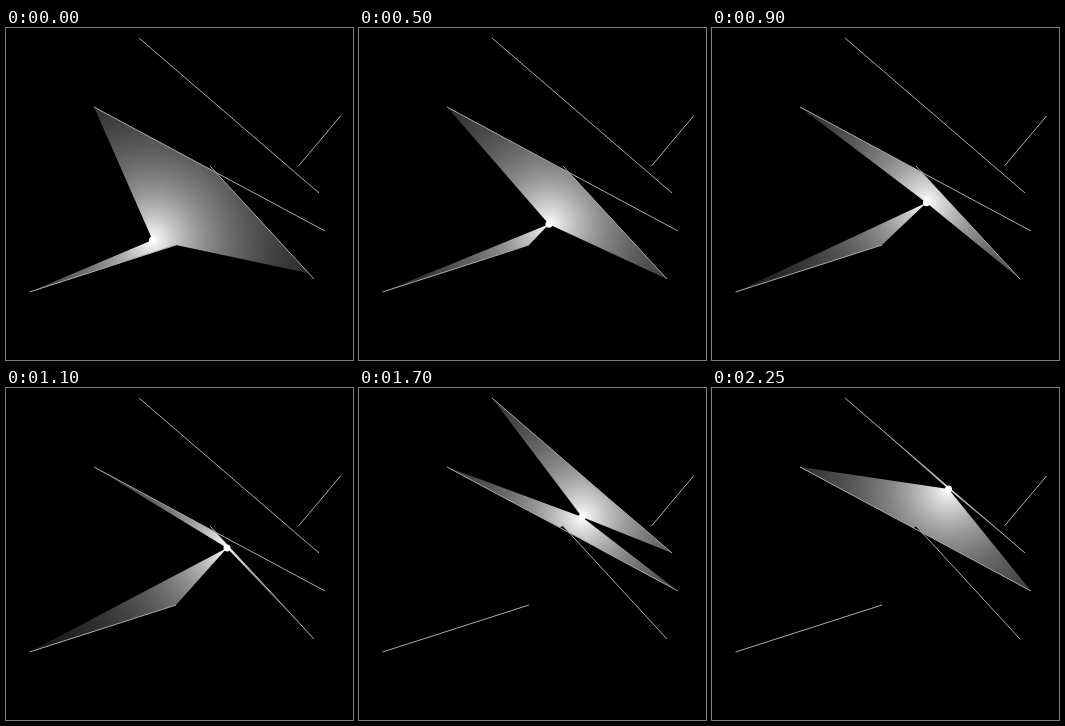
An HTML page with a canvas for the animation above (2.3 s loop, 347 by 332 pixels).

```html
<!DOCTYPE html>
<html lang="en">
<head>
<meta charset="utf-8">
<title>Light and walls</title>
<style>
html, body { margin: 0; width: 100%; height: 100%; overflow: hidden; background: #000; }
canvas { display: block; width: 347px; height: 332px; }
</style>
</head>
<body>
<canvas id="stage" width="347" height="332"></canvas>
<script>
const ctx = document.getElementById('stage').getContext('2d');
const LOOP = 2300, STEP = 50, REACH = 250, FADE = 90;

// x1, y1, x2, y2
const walls = [
  [133, 10, 313, 165],
  [334.5, 88, 292.5, 138],
  [88, 79, 319, 203],
  [204, 138, 308, 251],
  [23.5, 264, 170, 217]
];

// Key points of the light: time, x, y
const path = [
  [0, 146.5, 212],
  [700, 205, 188],
  [1100, 221, 160],
  [1350, 231, 146],
  [1700, 223, 129],
  [2250, 236.5, 101]
];

function slope(i, k) {
  const a = path[Math.max(i - 1, 0)], b = path[Math.min(i + 1, path.length - 1)];
  return (b[k] - a[k]) / (b[0] - a[0]);
}

// Smooth curve through the key points
function lightAt(t) {
  let i = 0;
  while (i < path.length - 2 && t >= path[i + 1][0]) i++;
  const a = path[i], b = path[i + 1], span = b[0] - a[0];
  const u = Math.min((t - a[0]) / span, 1), v = 1 - u;
  return [1, 2].map(k => a[k] * v * v * (1 + 2 * u) + b[k] * u * u * (3 - 2 * u)
    + span * u * v * (v * slope(i, k) - u * slope(i + 1, k)));
}

// Distance along a ray to the line of a wall, and the place on that wall
function cast(p, angle, w) {
  const dx = Math.cos(angle), dy = Math.sin(angle);
  const ex = w[2] - w[0], ey = w[3] - w[1];
  const fx = w[0] - p[0], fy = w[1] - p[1];
  const det = dx * ey - dy * ex;
  return { dist: (fx * ey - fy * ex) / det, at: (fx * dy - fy * dx) / det };
}

const along = (p, angle, d) => [p[0] + Math.cos(angle) * d, p[1] + Math.sin(angle) * d];

function crossings() {
  const found = [];
  walls.forEach((a, i) => walls.slice(i + 1).forEach(b => {
    const angle = Math.atan2(a[3] - a[1], a[2] - a[0]);
    const length = Math.hypot(a[2] - a[0], a[3] - a[1]);
    const hit = cast(a, angle, b);
    if (hit.dist > 0 && hit.dist < length && hit.at > 0 && hit.at < 1) {
      found.push(along(a, angle, hit.dist));
    }
  }));
  return found;
}

const corners = walls.flatMap(w => [[w[0], w[1]], [w[2], w[3]]]).concat(crossings());

function nearest(p, angle) {
  let best = null, dist = Infinity;
  for (const w of walls) {
    const hit = cast(p, angle, w);
    if (hit.dist > 0 && hit.dist < dist && hit.at >= 0 && hit.at <= 1) {
      best = w;
      dist = hit.dist;
    }
  }
  return best;
}

// One triangle per gap between corner angles, out to the nearest wall
function litArea(p) {
  const angles = corners.map(c => Math.atan2(c[1] - p[1], c[0] - p[0])).sort((a, b) => a - b);
  angles.push(angles[0] + 2 * Math.PI);
  ctx.beginPath();
  for (let i = 0; i < angles.length - 1; i++) {
    const from = angles[i], to = angles[i + 1];
    if (to - from < 1e-7) continue;
    const w = nearest(p, (from + to) / 2);
    if (!w) continue;
    ctx.moveTo(...p);
    for (const angle of [from, to]) ctx.lineTo(...along(p, angle, cast(p, angle, w).dist));
    ctx.closePath();
  }
}

function glow(p) {
  const g = ctx.createRadialGradient(...p, 0, ...p, REACH);
  for (let s = 0; s <= 1; s += 1 / 16) {
    const v = Math.round(255 * Math.exp(-s * REACH / FADE));
    g.addColorStop(s, `rgb(${v},${v},${v})`);
  }
  return g;
}

function draw(t) {
  const p = lightAt(t);
  ctx.fillStyle = '#000';
  ctx.fillRect(0, 0, 347, 332);

  ctx.fillStyle = glow(p);
  litArea(p);
  ctx.fill();

  ctx.strokeStyle = '#aaa';
  ctx.lineWidth = 1;
  ctx.beginPath();
  for (const w of walls) {
    ctx.moveTo(w[0], w[1]);
    ctx.lineTo(w[2], w[3]);
  }
  ctx.stroke();

  ctx.fillStyle = '#fff';
  ctx.beginPath();
  ctx.arc(...p, 3.5, 0, 2 * Math.PI);
  ctx.fill();
}

const start = performance.now();
function tick() {
  const t = (performance.now() - start) % LOOP;
  draw(Math.floor(t / STEP) * STEP);
  requestAnimationFrame(tick);
}
tick();
</script>
</body>
</html>
```
